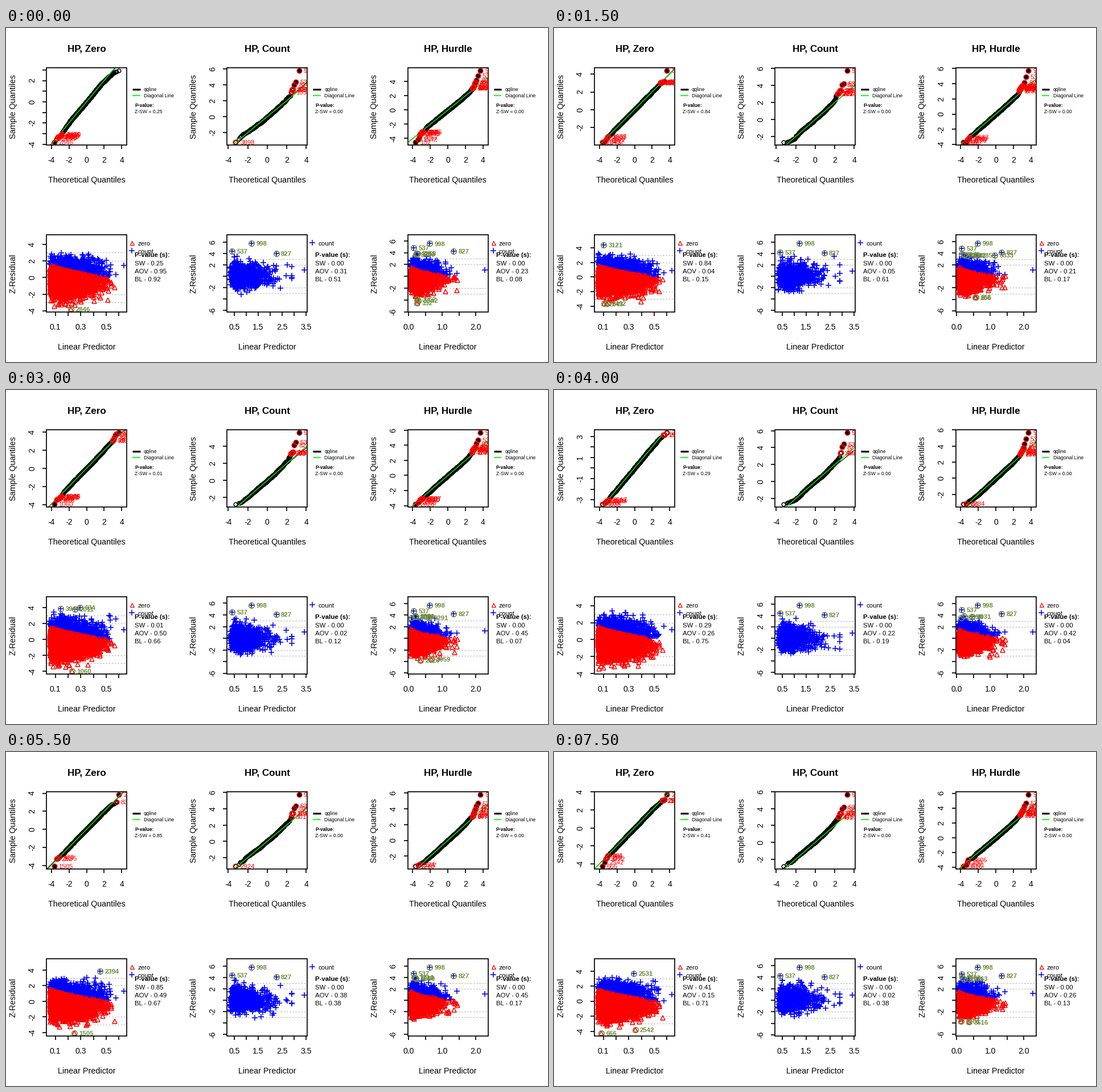
A matplotlib script for the animation above (8000 ms loop, 952 by 588 pixels).

```python
import math
import numpy as np
import matplotlib.pyplot as plt
from matplotlib.animation import FuncAnimation
from matplotlib.patches import Rectangle

W, H, DPI = 952, 588, 100
PT = 72 / DPI
FRAMES = 16
STEP = W / 3                      # distance between panel columns
BOX_X, BOX_W, BOX_H = 71, 141, 136
TOP, LOW = 206, 500               # lower edges of the two panel rows
OLIVE, GREY = "#6e8b3d", "#bebebe"
TITLES = ("HP, Zero", "HP, Count", "HP, Hurdle")
QX = (15.45, 17.1, 15.45)         # px per theoretical quantile
# first tick px, first tick value, tick step, tick count, px per unit
LP_AXES = ((86.5, .1, .1, 6, 223.75), (401, .5, .5, 7, 42), (707, 0, .5, 5, 59.2))

N, CUT = 4406, 3.5
# id: probability, count mean, count residual, extra in the hurdle panel
NAMED = {
    998: (.36, 1.21, 5.65, .05),
    537: (.13, .41, 4.35, .4),
    827: (.53, 2.25, 4.1, .1),
    3350: (.173, .5, 3.35, .5),
    4000: (.637, 3.43, .9, .2),
}

GRID = np.linspace(-6, 6, 4001)
CDF = np.array([.5 * (1 + math.erf(v / math.sqrt(2))) for v in GRID])


def qnorm(u):
    return np.interp(u, CDF, GRID)


def pnorm(z):
    return np.interp(z, GRID, CDF)


# ---- fixed sample: hurdle probability, group, count mean ----
base = np.random.default_rng(7)
prob = np.minimum(.055 + .58 * base.beta(1.5, 4.3, N), .6)
pos = base.random(N) < prob
mu = np.clip(.22 + 2.7 * prob * np.exp(.4 * base.standard_normal(N)), .32, 2.9)
for i, (pr, m, _, _) in NAMED.items():
    prob[i], mu[i], pos[i] = pr, m, True
mean = prob * mu / (1 - np.exp(-mu))
IDS = np.arange(N)


def simulate(k):
    """Randomised residuals and p-values of one replicate."""
    rng = np.random.default_rng(100 + k)

    def mix(tail):
        return qnorm(np.where(pos, 1 - prob + prob * tail, rng.random(N) * (1 - prob)))

    zero = mix(rng.random(N))
    count = rng.standard_normal(N)
    count += .08 * np.maximum(count - .5, 0) ** 2
    count = np.minimum(count, CUT - .05)
    hurdle = mix(pnorm(count))
    for i, (_, _, z, lift) in NAMED.items():
        count[i] = z + rng.uniform(-.15, .15)
        hurdle[i] = z + lift + rng.uniform(-.15, .15)
    zero[4000] = rng.uniform(.6, 1.6)

    sw, aov, bl, u = rng.random(4)
    pvals = ((sw, aov, bl), (0, .02 + .4 * u ** 4, rng.uniform(.05, .75)),
             (0, rng.uniform(.1, .85), rng.uniform(.02, .2)))
    return (zero, count, hurdle), pvals


# ---- drawing in pixels, y downwards ----
plt.rcParams["font.family"] = "Liberation Sans"
fig = plt.figure(figsize=(W / DPI, H / DPI), dpi=DPI, facecolor="white")
ax = fig.add_axes((0, 0, 1, 1))


def text(x, y, s, size, ha="left", rot=0, color="black", weight="normal", clip=None):
    drop = .36 * size
    t = ax.text(x + (drop if rot else 0), y + (0 if rot else drop), s, fontsize=size * PT,
                ha=ha, va="baseline", rotation=rot, rotation_mode="anchor",
                color=color, weight=weight, zorder=3)
    if clip is not None:
        t.set_clip_path(clip)
        t.set_clip_on(True)


def line(xs, ys, color="black", lw=1.7, clip=None, ls="-"):
    art, = ax.plot(xs, ys, color=color, lw=lw * PT, ls=ls, solid_capstyle="butt", zorder=2)
    if clip is not None:
        art.set_clip_path(clip)


def marks(x, y, shape, color, size, lw=1.4, fill="none", clip=None):
    art, = ax.plot(x, y, ls="none", marker=shape, ms=size * PT, mew=lw * PT,
                   mec=color, mfc=fill, zorder=2)
    if clip is not None:
        art.set_clip_path(clip)


def thin(places, names):
    """Drop the labels that would come too close to the one before."""
    end = -1e9
    for p, s in zip(places, names):
        half = 7.1 * sum({"-": .333, ".": .278}.get(c, .556) for c in s)
        if p - half - end >= 11.8:
            end = p + half
            yield p, s


def x_axis(places, names, edge):
    for p in places:
        line([p, p], [edge, edge + 7])
    for p, s in thin(places, names):
        text(p, edge + 26, s, 14, "center")


def panel(col, edge, lo, hi, xlab, ylab):
    """Frame, y axis and axis titles; gives the clip box and the y mapping."""
    x0 = BOX_X + STEP * col
    box = Rectangle((x0, edge), BOX_W, -BOX_H, fill=False, ec="black", lw=1.7 * PT, zorder=2.5)
    ax.add_patch(box)
    pad = .04 * (hi - lo)
    a, b = lo - pad, hi + pad

    def py(v):
        return edge - BOX_H * (v - a) / (b - a)

    step = 1 if b - a < 7.78 else 2
    ticks = range(math.ceil(a / step) * step, math.floor(b / step) * step + 1, step)
    for v in ticks:
        line([x0 - 7, x0], [py(v)] * 2)
    for p, s in thin([-py(v) for v in ticks], [str(v) for v in ticks]):
        text(x0 - 26, -p, s, 14, "center", 90)
    text(x0 + BOX_W / 2, edge + 61, xlab, 14.2, "center")
    text(x0 - 59.5, edge - BOX_H / 2, ylab, 14.2, "center", 90)
    return box, py


def qq_panel(col, ids, z, sw):
    box, py = panel(col, TOP, z.min(), z.max(), "Theoretical Quantiles", "Sample Quantiles")
    dx = STEP * col
    mid = BOX_X + BOX_W / 2 + dx
    text(mid, 35, TITLES[col], 17, "center", weight="bold")
    ticks = range(-4, 5, 2)
    x_axis([mid + QX[col] * v for v in ticks], [str(v) for v in ticks], TOP)

    order = np.argsort(z)
    ids, z = ids[order], z[order]
    q = qnorm((np.arange(len(z)) + .5) / len(z))
    x, y = mid + QX[col] * q, py(z)
    marks(x, y, "o", "black", 6.6, 1.5, clip=box)
    far = abs(z) > CUT
    marks(x[far], y[far], "o", "black", 6.5, 1, "black", box)

    ends = np.array([-5, 5])
    q1, q3 = np.quantile(z, (.25, .75))
    line(mid + QX[col] * ends, py((q1 + q3) / 2 + ends * (q3 - q1) / 1.349), lw=1.2, clip=box)
    line(mid + QX[col] * ends, py(ends), "#00ff00", 1.4, box)

    out = np.flatnonzero(abs(z) > 3)
    marks(x[out], y[out], "o", "red", 8.5, 1.5, clip=box)
    for i in out:
        text(x[i] + 8, y[i], str(ids[i]), 11.4, color="red", clip=box)

    line([222 + dx, 235.5 + dx], [108, 108], lw=3.2)
    line([222 + dx, 235.5 + dx], [119, 119], "#00ff00", 1.8)
    text(242 + dx, 108, "qqline", 8.6)
    text(242 + dx, 118.5, "Diagonal Line", 8.6)
    text(226 + dx, 135.5, "P-value:", 8.6, weight="bold")
    text(226 + dx, 146.5, f"Z-SW = {sw:.2f}", 8.6)


def residual_panel(col, ids, xs, z, pvals):
    top = max(abs(z).max(), 3.7)
    box, py = panel(col, LOW, -top, top + 1, "Linear Predictor", "Z-Residual")
    dx = STEP * col
    px0, first, step, count, scale = LP_AXES[col]
    ticks = [first + step * i for i in range(count)]
    x_axis([px0 + (v - first) * scale for v in ticks], [f"{v:.1f}" for v in ticks], LOW)

    for v in (-3, -2, 2, 3):
        line([BOX_X + dx, BOX_X + BOX_W + dx], [py(v)] * 2, GREY, 1.3, box, (0, (2, 2)))
    x, y = px0 + (xs - first) * scale, py(z)
    blue = pos[ids]
    marks(x[blue], y[blue], "+", "blue", 10, 1.6, clip=box)
    marks(x[~blue], y[~blue], "^", "red", 8.4, 1.5, clip=box)
    out = np.flatnonzero(abs(z) > CUT)
    marks(x[out], y[out], "o", OLIVE, 9.5, 1.6, clip=box)
    for i in out:
        text(x[i] + 8.5, y[i], str(ids[i]), 11.4, color=OLIVE, weight="bold", clip=box)

    y0 = 378
    if col != 1:
        marks([221 + dx], [y0], "^", "red", 7, 1.3)
        text(231 + dx, y0 + 1, "zero", 11.4)
        y0 += 14
    marks([221 + dx], [y0], "+", "blue", 10, 1.5)
    text(231 + dx, y0 + 1, "count", 11.4)
    text(226 + dx, 399, "P-value (s):", 11.4, weight="bold")
    for i, (name, v) in enumerate(zip(("SW", "AOV", "BL"), pvals)):
        text(226 + dx, 413.5 + 14.3 * i, f"{name} - {v:.2f}", 11.4)


def draw(k):
    ax.clear()
    ax.set_axis_off()
    ax.set_xlim(0, W)
    ax.set_ylim(H, 0)
    zs, pvals = simulate(k)
    groups = (IDS, IDS[pos], IDS)
    for col, (ids, xs) in enumerate(zip(groups, (prob, mu, mean))):
        z = zs[col][ids]
        qq_panel(col, ids, z, pvals[col][0])
        residual_panel(col, ids, xs[ids], z, pvals[col])
    return []


anim = FuncAnimation(fig, draw, frames=FRAMES, interval=500, repeat=True,
                     repeat_delay=0, init_func=lambda: [], blit=False)
plt.show()
```
